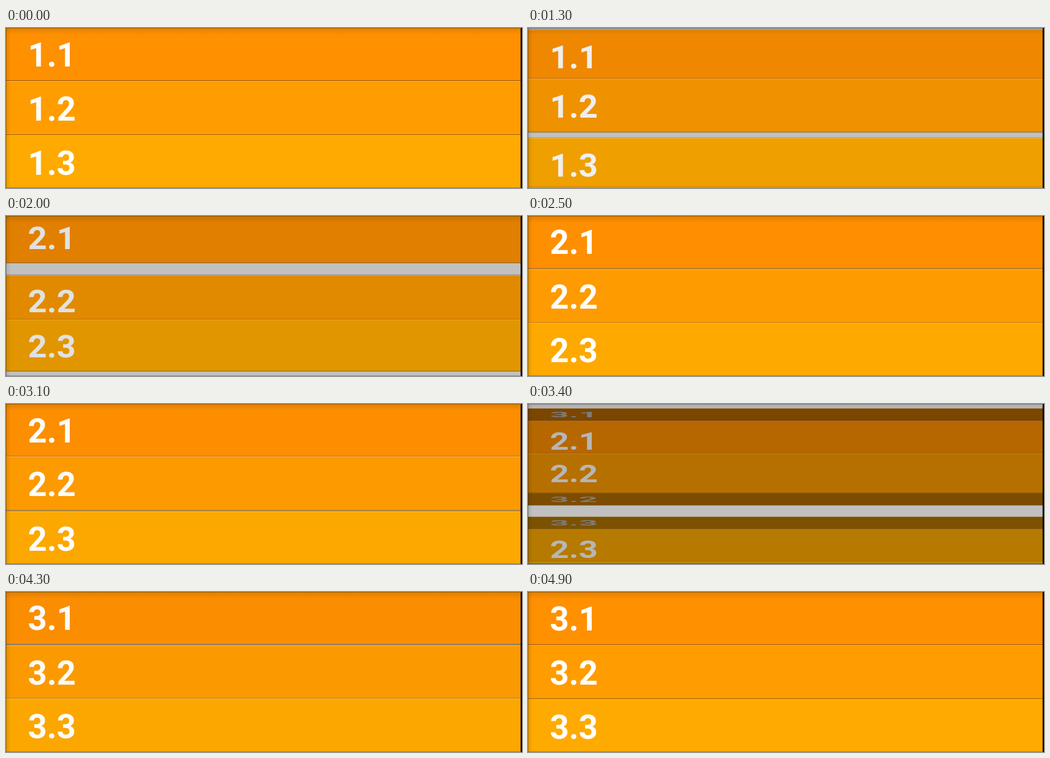
An HTML page with a canvas that plays this animation: 850x266 px, repeating every 5 s.

```html
<!DOCTYPE html>
<html lang="en">
<head>
<meta charset="utf-8">
<title>Rotating rows</title>
<style>
  html, body { margin: 0; width: 100%; height: 100%; overflow: hidden; background: #000; }
  canvas { display: block; }
</style>
</head>
<body>
<canvas width="850" height="266"></canvas>
<script>
const ctx = document.querySelector('canvas').getContext('2d');
const WIDTH = 848, HEIGHT = 266, ROW = 90;
const RADIUS = ROW / (2 * Math.sqrt(3)); // inradius of a three-sided prism
const LOOP = 5000, STEP = 100, TURN = 1500, STARTS = [1168, 3058];
const COLORS = ['#ff9000', '#ff9c00', '#ffaa00', '#ffb700'];

// cubic-bezier(.25, .1, .25, 1), solved by bisection
function ease(x) {
  if (x <= 0) return 0;
  if (x >= 1) return 1;
  const curve = (s, a, b) => 3 * (1 - s) ** 2 * s * a + 3 * (1 - s) * s * s * b + s ** 3;
  let low = 0, high = 1;
  for (let i = 0; i < 24; i++) {
    const mid = (low + high) / 2;
    if (curve(mid, .25, .25) < x) low = mid; else high = mid;
  }
  return curve(low, .1, 1);
}

function drawFace(row, face, turns) {
  const thirds = turns - face;
  const angle = thirds * Math.PI * 2 / 3;
  const squash = Math.cos(angle);
  if (Math.abs(thirds) >= .75 || squash <= 0) return;
  const direction = row % 2 ? -1 : 1;

  ctx.save();
  ctx.translate(0, 43 + row * ROW + direction * RADIUS * Math.sin(angle));
  ctx.scale(1, squash);
  const fill = (color, y, height) => {
    ctx.fillStyle = color;
    ctx.fillRect(0, y, WIDTH, height);
  };
  // Dark hairlines just outside the face
  fill('rgba(0,0,0,.25)', -ROW / 2 - 1, 1);
  fill('rgba(0,0,0,.25)', ROW / 2, 1);
  fill(COLORS[row], -ROW / 2, ROW);
  fill('rgba(255,255,255,.3)', -ROW / 2, 1);
  fill('rgba(0,0,0,.25)', ROW / 2 - 1, 1);
  ctx.fillStyle = '#fff';
  ctx.font = 'bold 55px Roboto, sans-serif';
  ctx.fillText(`${face + 1}.${row + 1}`, 36, 20.5);
  fill(`rgba(0,0,0,${.8 * Math.abs(thirds)})`, -ROW / 2, ROW);
  ctx.restore();
}

function drawShade(width, height, endX, endY) {
  const shade = ctx.createLinearGradient(0, 0, endX, endY);
  shade.addColorStop(0, 'rgba(0,0,0,.1)');
  shade.addColorStop(1, 'rgba(0,0,0,0)');
  ctx.fillStyle = shade;
  ctx.fillRect(0, 0, width, height);
}

function draw(time) {
  const turns = STARTS.reduce((sum, start) => sum + ease((time - start) / TURN), 0);
  ctx.fillStyle = '#c1c1c1';
  ctx.fillRect(0, 0, WIDTH, HEIGHT);
  for (let row = 0; row < 4; row++)
    for (let face = 0; face < 3; face++) drawFace(row, face, turns);

  drawShade(WIDTH, 12, 0, 12);
  drawShade(8, HEIGHT, 8, 0);
  ctx.strokeStyle = 'rgba(0,0,0,.28)';
  ctx.strokeRect(.5, .5, WIDTH - 1, HEIGHT - 1);
  ctx.fillStyle = '#000';
  ctx.fillRect(WIDTH, 0, 2, HEIGHT);
}

// Motion is held in 100 ms steps; the small lead absorbs timer jitter.
const origin = performance.now();
function tick() {
  const elapsed = (performance.now() - origin + 20) % LOOP;
  draw(Math.floor(elapsed / STEP) * STEP);
  requestAnimationFrame(tick);
}
tick();
</script>
</body>
</html>
```
